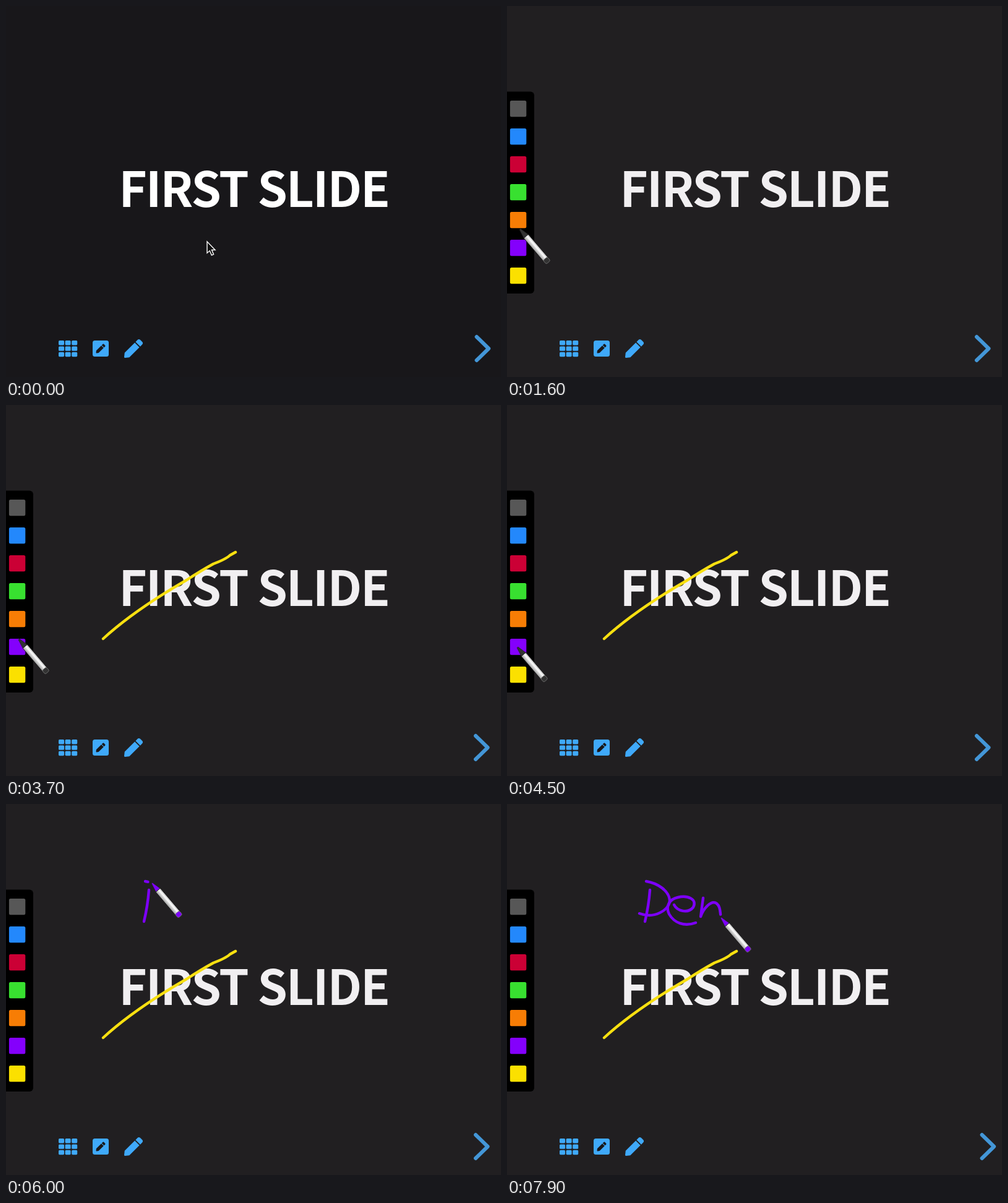
These frames come from a looping animation (800x600 px, 8000 ms). An HTML page:

```html
<!DOCTYPE html>
<html lang="en">
<head>
<meta charset="utf-8">
<title>Slide annotation</title>
<style>
  html, body { margin: 0; width: 100%; height: 100%; overflow: hidden; background: #18171a; }
  svg { display: block; width: 800px; height: 600px; }
  #title {
    font: 700 78px "Noto Sans CJK JP", "Noto Sans CJK SC", "Noto Sans CJK", "Open Sans", sans-serif;
    letter-spacing: -2.1px;
  }
  .ink { fill: none; stroke-width: 4.4; stroke-linecap: round; stroke-linejoin: round; }
</style>
</head>
<body>
<svg viewBox="0 0 800 600">
  <defs>
    <path id="pencil" d="M291 93l128 128-278 278-114 12.6C11 513-1.5 500 .1 485l12.7-114zM498 74l-60-60c-19-19-49-19-68 0l-57 57 128 128 57-57c19-19 19-49 0-68z"/>
    <linearGradient id="barrel" x2="0" y2="1">
      <stop offset="0" stop-color="#b9b9b9"/>
      <stop offset=".35" stop-color="#fff"/>
      <stop offset="1" stop-color="#999"/>
    </linearGradient>
  </defs>
  <rect id="back" width="800" height="600"/>
  <text id="title" x="400.5" y="325" text-anchor="middle">FIRST SLIDE</text>
  <g fill="#3fa9fa">
    <g id="grid"></g>
    <rect x="140" y="541" width="26" height="26" rx="3.5"/>
    <use href="#pencil" transform="translate(145.5 546.5) scale(.0293)" fill="#19181a"/>
    <use href="#pencil" transform="translate(191 539) scale(.0588)"/>
  </g>
  <path id="next" d="M759 535L778.500 554L759 573" fill="none" stroke="#4396d7" stroke-width="6" stroke-linecap="round" stroke-linejoin="round"/>
  <g id="palette"><rect x="-10" y="138.500" width="54" height="326.500" rx="6"/></g>
  <g id="board"></g>
  <path id="arrow" d="M0 0V18.500L4.200 14.800L7.300 22L10.600 20.600L7.500 13.500H13Z" fill="#111" stroke="#fff" stroke-width="1.4"/>
  <g id="pen">
    <path class="tint" d="M0 -1L15 -4.500V4.500L0 1Z" stroke="#222" stroke-width=".8"/>
    <rect x="15" y="-4.800" width="49" height="9.600" rx="1" fill="url(#barrel)" stroke="#111" stroke-width=".8"/>
    <rect class="tint" x="62.500" y="-4.400" width="8" height="8.800" rx="2.500" stroke="#777" stroke-width=".8"/>
  </g>
</svg>
<script>
const LOOP = 8000, STEP = 100, OPEN = 700, INK_LAG = 30;
const YELLOW = '#f8e010', PURPLE = '#7d00fa', NEUTRAL = '#333';
const $ = id => document.getElementById(id);

function add(parent, tag, attrs) {
  const el = document.createElementNS('http://www.w3.org/2000/svg', tag);
  for (const key in attrs) el.setAttribute(key, attrs[key]);
  return parent.appendChild(el);
}

for (let i = 0; i < 9; i++)
  add($('grid'), 'rect', {
    x: 85 + i % 3 * 10.6, y: 541 + Math.floor(i / 3) * 9.4, width: 9, height: 7.4, rx: 1.6
  });

['#575757', '#2388fc', '#cb0035', '#38e030', '#f77d05', '#8400fc', '#fbe000'].forEach((fill, i) =>
  add($('palette'), 'rect', { x: 4.9, y: 152.9 + i * 45, width: 26.4, height: 26.4, rx: 2.5, fill }));

// Pointer route: start, end, path and, for drawn strokes, the ink colour.
const route = [
  [0, 600, 'M325 381L208 556'],
  [900, 1600, 'M208 556C190 470 120 385 21 361'],
  [1600, 1850, 'M21 361L18 433'],
  [2000, 2230, 'M18 433L157 378'],
  [2250, 2723, 'M157 378C192 346 235 316 292 283Q315 268 335 257Q356 249 362 243L371 238', YELLOW],
  [2850, 3700, 'M371 238Q200 300 21 379'],
  [3700, 3850, 'M21 379L17 392'],
  [4500, 5300, 'M17 392Q100 220 232 139'],
  [5330, 5700, 'M231 139Q229 165 223 190', PURPLE],
  [5750, 5940, 'M223 190L225 125'],
  [5950, 6450, 'M225 125C243 128 262 140 263 156C262 172 238 186 214 177', PURPLE],
  [6460, 6650, 'M214 177L270 163'],
  [6665, 7250, 'M270 163C275 173 292 178 301 167C308 154 292 147 276 151C262 154 256 166 262 178C270 192 286 199 305 192', PURPLE],
  [7260, 7390, 'M305 192L317 152'],
  [7400, 7900, 'M317 152L313 182C317 170 330 154 339 161C345 166 344 174 346 184', PURPLE]
].map(([start, end, d, ink]) => {
  const path = add($('board'), 'path', { d, class: 'ink', stroke: ink || 'none' });
  return { start, end, ink, path, length: path.getTotalLength() };
});

const clamp = v => Math.max(0, Math.min(1, v));
const smooth = p => p * p * (3 - 2 * p);
const progress = (leg, t) => clamp((t - leg.start) / (leg.end - leg.start));

// Horizontal bounce: rest, right, rest, left, rest.
const bounceKeys = [[0, 0], [.1, 0], [.2, 11], [.25, 0], [.3, -5.5], [.4, 0], [1, 0]];
function bounce(t) {
  const phase = (.234 + t * 6 / LOOP) % 1;
  const i = bounceKeys.findIndex(key => key[0] > phase);
  const [t0, x0] = bounceKeys[i - 1], [t1, x1] = bounceKeys[i];
  return x0 + (x1 - x0) * (1 - (1 - (phase - t0) / (t1 - t0)) ** 1.7);
}

function pointer(t) {
  const leg = route.findLast(l => l.start <= t);
  const p = progress(leg, t);
  return leg.path.getPointAtLength(leg.length * (leg.ink ? p : smooth(p)));
}

function draw(now) {
  const t = Math.floor(now % LOOP / STEP) * STEP;
  const open = t >= OPEN;
  const { x, y } = pointer(t);

  $('back').setAttribute('fill', open ? '#211f21' : '#18171a');
  $('title').setAttribute('fill', open ? '#f1eff1' : '#fff');
  $('next').setAttribute('transform', `translate(${bounce(t)})`);
  $('palette').style.display = $('pen').style.display = open ? '' : 'none';
  $('arrow').style.display = open ? 'none' : '';
  $('arrow').setAttribute('transform', `translate(${x} ${y})`);
  $('pen').setAttribute('transform', `translate(${x} ${y}) rotate(49.5)`);

  const tint = x < 44 || t < 1950 ? NEUTRAL : t < 3900 ? YELLOW : PURPLE;
  document.querySelectorAll('.tint').forEach(el => el.setAttribute('fill', tint));

  for (const leg of route) {
    const drawn = leg.length * progress(leg, t - INK_LAG);
    leg.path.style.display = leg.ink && drawn > 0 ? '' : 'none';
    leg.path.setAttribute('stroke-dasharray', `${drawn} 999`);
  }
  requestAnimationFrame(draw);
}
requestAnimationFrame(draw);
</script>
</body>
</html>
```
